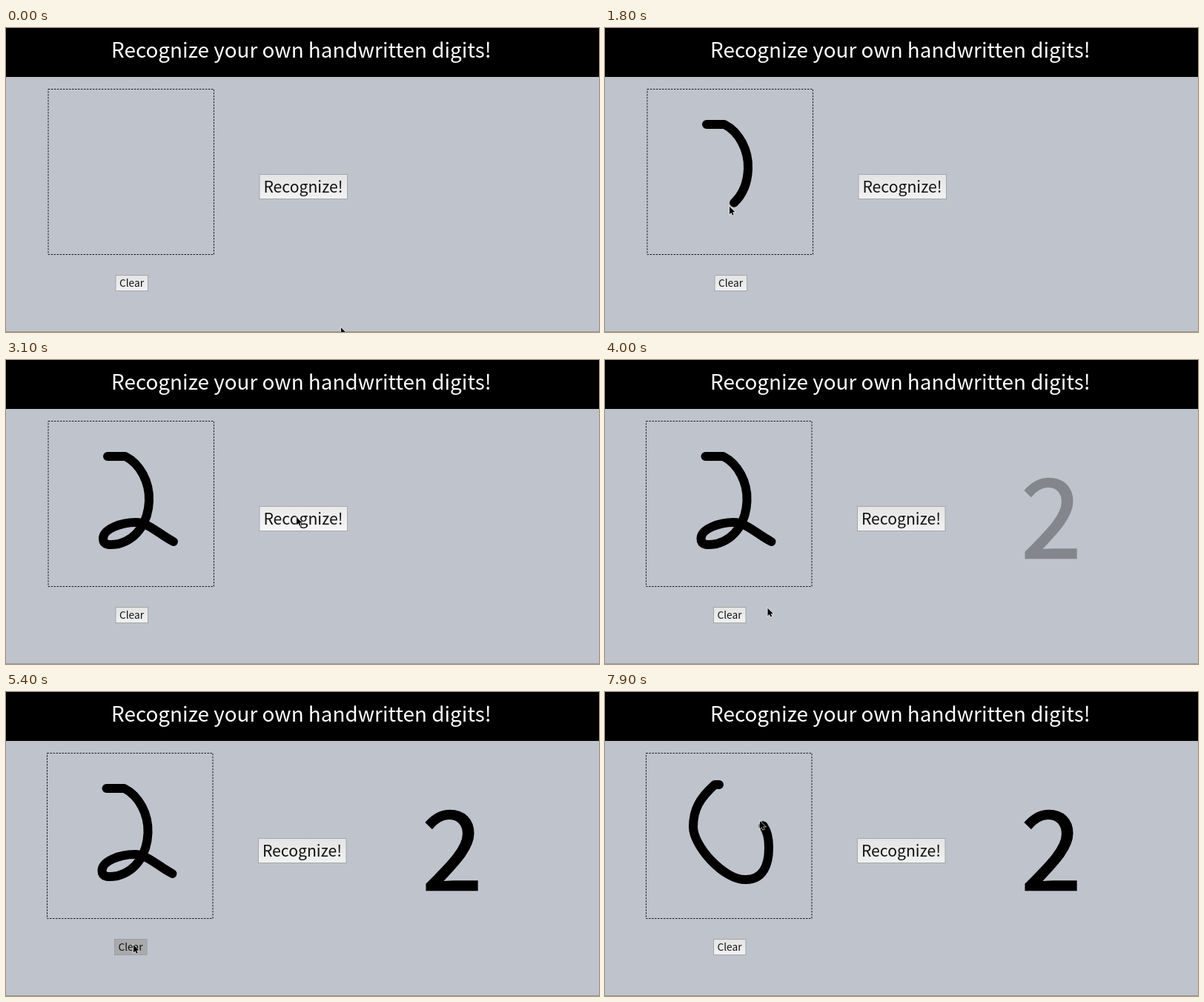
These frames come from a looping animation (800 by 410 pixels, 8000 ms). An HTML page:

```html
<!DOCTYPE html>
<html lang="en">
<head>
<meta charset="utf-8">
<title>Handwritten digits</title>
<style>
  html, body { margin: 0; width: 100%; height: 100%; overflow: hidden; background: #bfc3cc; }
  svg { display: block; width: 800px; height: 410px; }
  text { font-family: "Noto Sans CJK JP", "Noto Sans CJK SC", "Noto Sans CJK", "Noto Sans CJK KR", "Noto Sans", sans-serif; text-anchor: middle; fill: #111; }
  #title { fill: #fff; }
  #answer { fill: #000; stroke: #000; stroke-width: 2.4; }
  .button rect { fill: url(#face); stroke: #a4a6ab; }
  .hover rect { filter: brightness(1.02); }
  .pressed rect { fill: #a9aaab; stroke: #9c9ea2; filter: none; }
  .ink { fill: none; stroke: #000; stroke-width: 12; stroke-linecap: round; stroke-linejoin: round; }
</style>
</head>
<body>
<svg viewBox="0 0 800 410">
  <linearGradient id="face" x2="0" y2="1"><stop stop-color="#e4e4e5"/><stop offset="1" stop-color="#f2f2f2"/></linearGradient>
  <rect width="800" height="410" fill="#bfc3cc"/>
  <rect y="409" width="800" height="1" fill="#94979f"/>
  <rect width="800" height="66"/>
  <text id="title" x="398.4" y="40" font-size="27.86">Recognize your own handwritten digits!</text>
  <g id="form">
    <rect x="57" y="82.5" width="223.5" height="223" fill="none" stroke="#15161a" stroke-dasharray="2.4 1.6"/>
    <g class="button" id="recognize">
      <rect x="342" y="197.5" width="118.5" height="33"/>
      <text x="401" y="222" font-size="21.2">Recognize!</text>
    </g>
    <g class="button" id="clear">
      <rect x="148" y="333.5" width="43.5" height="21"/>
      <text x="169.5" y="349.2" font-size="13.7">Clear</text>
    </g>
    <g id="first"></g>
  </g>
  <g id="second"></g>
  <text id="answer" x="602" y="267" font-size="147" opacity="0">2</text>
  <path id="cursor" d="M0 0V10.5L2.4 8.3 4 11.8 5.7 11 4.2 7.6H7.5Z" stroke="#fff" stroke-width="1.3" stroke-opacity=".8" paint-order="stroke"/>
</svg>
<script>
const LOOP = 8000, STEP = 100, PEN_LAG = 8;
const ANSWER_AT = 3775, FADE = 600, CLEAR_AT = 5500;

const $ = id => document.getElementById(id);
const clamp = p => Math.min(1, Math.max(0, p));
const swing = p => 0.5 - Math.cos(Math.PI * p) / 2;
const easeOut = p => 1 - (1 - p) ** 2;

// A leg is one cursor movement along a path; with a layer it also leaves ink.
function leg(start, end, d, layer) {
  const path = document.createElementNS("http://www.w3.org/2000/svg", "path");
  path.setAttribute("d", d);
  path.setAttribute("class", "ink");
  if (layer) $(layer).append(path);
  return { start, end, path, layer, length: path.getTotalLength() };
}

const legs = [
  leg(0, 100, "M452 404L300 220"),
  leg(200, 1100, "M300 220L137 130"),
  leg(1200, 2400, "M137 130H161C181 140 194 165 193 190C192 217 178 241 152 248C140 250 131 250 131 241C131 228 155 219 175 219C192 219 208 236 226 245", "first"),
  leg(2500, 3100, "M226 245L392 212"),
  leg(3600, 4300, "M392 212Q265 345 172 341"),
  leg(5700, 6200, "M172 341L148 126"),
  leg(6400, 6600, "M148 126L154 125"),
  leg(7000, 7900, "M154 125H148C128 143 119 158 119 182C119 207 160 254 190 253C214 253 221 232 221 210C221 199 219 188 214 181L209 174", "second")
];

function travelled({ start, end, length, layer }, t) {
  const p = clamp((t - start) / (end - start));
  return length * (layer ? p : easeOut(p));
}

function drawInk(stroke, t) {
  const dry = t > stroke.end;
  const inked = dry ? stroke.length : travelled(stroke, t) - PEN_LAG;
  stroke.path.setAttribute("visibility", inked > 0 ? "visible" : "hidden");
  stroke.path.setAttribute("stroke-dasharray", `${Math.max(inked, 0)} ${stroke.length + 9}`);
}

function setButton(id, { x, y }, pressed) {
  const box = $(id).firstElementChild.getBBox();
  const over = x > box.x && x < box.x + box.width && y > box.y && y < box.y + box.height;
  $(id).setAttribute("class", `button ${over ? "hover" : ""} ${pressed ? "pressed" : ""}`);
}

const shift = (id, x, y = 0) => $(id).setAttribute("transform", `translate(${x} ${y})`);

function render(t) {
  const current = legs.findLast(({ start }) => start <= t);
  const cursor = current.path.getPointAtLength(travelled(current, t));
  shift("cursor", cursor.x, cursor.y);
  shift("form", t >= ANSWER_AT ? -1.5 : 0);
  legs.filter(({ layer }) => layer).forEach(stroke => drawInk(stroke, t));
  $("first").setAttribute("display", t < CLEAR_AT ? "inline" : "none");
  setButton("recognize", cursor, t >= 3500 && t < 3600);
  setButton("clear", cursor, t >= CLEAR_AT - STEP && t < CLEAR_AT);
  $("answer").setAttribute("opacity", swing(clamp((t - ANSWER_AT) / FADE)));
}

function frame() {
  const t = performance.now() % LOOP;
  render(Math.floor(t / STEP) * STEP);
  requestAnimationFrame(frame);
}
frame();
</script>
</body>
</html>
```
